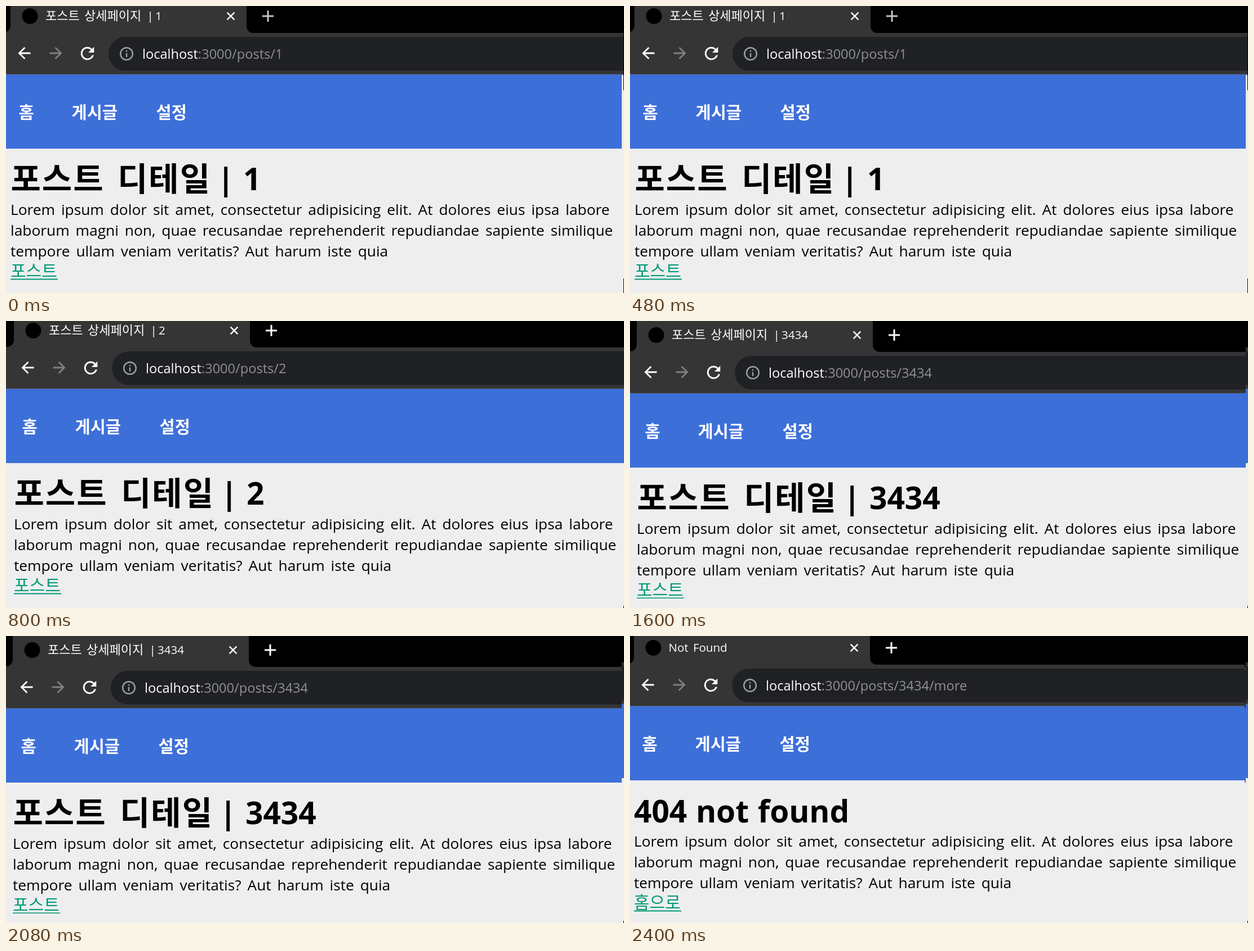
Recreate the animation shown at these times as an HTML page with a canvas. Size 1097 by 511 pixels, loop 3200 ms.

```html
<!DOCTYPE html>
<html lang="ko">
<head>
<meta charset="utf-8">
<title>Posts</title>
<style>
  html, body { margin: 0; width: 100%; height: 100%; overflow: hidden; background: #eee; }
  canvas { display: block; }
</style>
</head>
<body>
<canvas id="stage" width="1097" height="511"></canvas>
<script>
const ctx = document.getElementById('stage').getContext('2d');
const LATIN = '"Open Sans", "Noto Sans", sans-serif';
const HANGUL = '"Noto Sans CJK KR", "Noto Sans CJK", sans-serif';
const HOLD = 800;

// Each screen covers a w x h area, shifted by (dx, dy), on top of the earlier ones.
const screens = [
  { id: '1', path: '1', dx: 0, dy: 0, w: 1097, h: 511, plus: '#c6c6c6' },
  { id: '2', path: '2', dx: 6, dy: -1, w: 1097, h: 507 },
  { id: '3434', path: '3434', dx: 4, dy: 7, w: 1093, h: 494 },
  { path: '3434/more', dx: -1, dy: 3, w: 1091, h: 494 },
];

const lorem = [
  'Lorem ipsum dolor sit amet, consectetur adipisicing elit. At dolores eius ipsa labore',
  'laborum magni non, quae recusandae reprehenderit repudiandae sapiente similique',
  'tempore ullam veniam veritatis? Aut harum iste quia',
];

const icons = {
  arrow: new Path2D('M20 11H7.83l5.59-5.59L12 4l-8 8 8 8 1.41-1.41L7.83 13H20z'),
  reload: new Path2D('M17.65 6.35A8 8 0 1 0 19.73 14h-2.08A6 6 0 1 1 16.22 7.78L13 11h7V4z'),
  info: new Path2D('M11 7h2v2h-2zM11 11h2v6h-2zM12 2a10 10 0 1 0 0 20 10 10 0 0 0 0-20zM12 4a8 8 0 1 1 0 16 8 8 0 0 1 0-16z'),
};

function text(str, x, y, size, color, { font = LATIN, weight = 400, gap = 0, tracking = 0 } = {}) {
  ctx.font = `${weight} ${size}px ${font}`;
  ctx.wordSpacing = gap + 'px';
  ctx.letterSpacing = tracking + 'px';
  ctx.fillStyle = color;
  ctx.fillText(str, x, y);
  return ctx.measureText(str).width;
}

const hangul = (str, x, y, size, color, weight = 400, tracking = 0) =>
  text(str, x, y, size, color, { font: HANGUL, weight, tracking });

function box(x, y, w, h, color, radius = 0) {
  ctx.fillStyle = color;
  ctx.beginPath();
  ctx.roundRect(x, y, w, h, radius);
  ctx.fill();
}

function icon(name, x, y, scale, color, flip = 1) {
  ctx.save();
  ctx.translate(x, y);
  ctx.scale(scale * flip, scale);
  ctx.translate(-12, -12);
  ctx.fillStyle = color;
  ctx.fill(icons[name], 'evenodd');
  ctx.restore();
}

function cross(x, y, r, width, color, angle) {
  ctx.save();
  ctx.translate(x, y);
  ctx.rotate(angle);
  box(-r, -width / 2, 2 * r, width, color);
  box(-width / 2, -r, width, 2 * r, color);
  ctx.restore();
}

function drawBrowser({ id, path, plus = '#fff' }) {
  box(-20, -20, 1140, 142, '#353535');
  box(-20, -20, 28, 67, '#000', [0, 0, 12, 0]);
  box(427, -20, 700, 68, '#000', [0, 0, 0, 12]);
  box(28.5, 4, 28, 28, '#000', 14);
  if (id) {
    hangul('포스트', 70, 25, 22, '#fff');
    hangul('상세페이지', 139, 25, 22, '#fff');
    text('|', 250.5, 25, 20.5, '#fff');
    text(id, 265, 25, 20.5, '#fff');
  } else {
    text('Not Found', 69.5, 25, 20.5, '#fff', { gap: 3 });
  }
  cross(399, 18, 9, 2.5, '#fff', Math.PI / 4);
  cross(465, 18, 10, 3, plus, 0);

  icon('arrow', 32.5, 84, 1.38, '#fff');
  icon('arrow', 88.5, 84, 1.38, '#808080', -1);
  icon('reload', 144.5, 84.5, 1.47, '#fff');
  box(182, 55, 960, 60, '#202124', 30);
  icon('info', 214, 85, 1.2, '#9aa0a6');
  const hostWidth = text('localhost', 242, 94, 23.6, '#fff');
  text(':3000/posts/' + path, 242 + hostWidth, 94, 23.6, '#8f9194');
  box(-20, 121, 1140, 1, '#555658');
}

function drawPage({ id }) {
  box(-20, 122, 1140, 132, '#3d6fd9');
  hangul('홈', 22.5, 200, 29.5, '#fff', 700);
  hangul('게시글', 116.5, 200, 29.5, '#fff', 700);
  hangul('설정', 266.5, 200, 29.5, '#fff', 700);

  box(-20, 254, 1140, 280, '#eee');
  const bold = { weight: 700, gap: 1.5 };
  if (id) {
    hangul('포스트', 8.5, 329, 58, '#000', 700, 2);
    hangul('디테일', 198, 329, 58, '#000', 700, 2);
    text('|', 375, 328, 55, '#000', bold);
    text(id, 421, 328, 55, '#000', bold);
  } else {
    text('404 not found', 8, 329, 55, '#000', bold);
  }
  lorem.forEach((line, i) => text(line, 8, 372 + 37 * i, 26.3, '#000', { gap: 4.1 }));
  hangul(id ? '포스트' : '홈으로', 8, 482, 30, '#009975');
  box(8, 485.5, 84, 2, '#009975');
}

function drawScreen(screen, index) {
  ctx.save();
  ctx.beginPath();
  ctx.rect(0, 0, screen.w, screen.h);
  ctx.clip();
  ctx.translate(screen.dx, screen.dy);
  drawBrowser(screen);
  drawPage(screen);
  if (index === 0) {
    box(1093, 123, 4, 388, '#eee');
    box(1096, 0, 1, 150, '#000');
    box(1096, 485, 1, 26, '#000');
  }
  ctx.restore();
}

function tick() {
  const current = Math.floor(performance.now() / HOLD) % screens.length;
  screens.slice(0, current + 1).forEach(drawScreen);
  requestAnimationFrame(tick);
}
tick();
</script>
</body>
</html>
```
